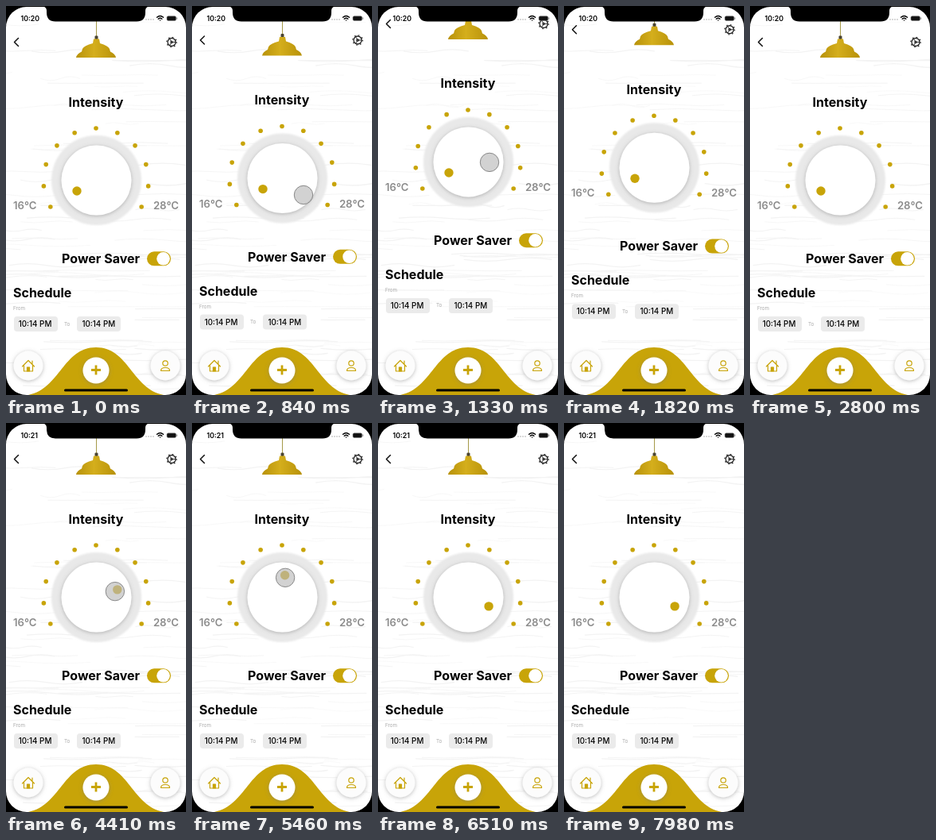
An HTML page that plays this animation: 226x490 px, repeating every 8 s.

```html
<!DOCTYPE html>
<html lang="en">
<head>
<meta charset="utf-8">
<style>
  html, body { margin: 0; width: 100%; height: 100%; overflow: hidden; background: #000; }
  svg { display: block; width: 100vw; height: 100vh; font-family: Inter, sans-serif; }
  .line { fill: none; stroke-linecap: round; stroke-linejoin: round; }
  .gold { fill: #c8a408; }
  .goldline { stroke: #c8a408; stroke-width: 1.2; }
  .title { font-size: 16px; font-weight: 750; }
  .temp { font-size: 13.2px; font-weight: 600; fill: #8c8c8c; }
  .small { font-size: 6.3px; fill: #aaa; }
  .time { font-size: 9.8px; font-weight: 500; text-anchor: middle; }
</style>
</head>
<body>
<svg viewBox="0 0 226 490">
  <defs>
    <clipPath id="screen"><rect y="1" width="226" height="489" rx="26"/></clipPath>
    <filter id="shadow" x="-40%" y="-40%" width="180%" height="180%">
      <feDropShadow dx="0" dy="1" stdDeviation="2.5" flood-color="#777" flood-opacity=".5"/>
    </filter>
    <filter id="soft" x="-20%" y="-20%" width="140%" height="140%"><feGaussianBlur stdDeviation=".8"/></filter>
    <linearGradient id="shade">
      <stop stop-color="#b8920a"/><stop offset=".45" stop-color="#d4ae1c"/><stop offset="1" stop-color="#b8920a"/>
    </linearGradient>
  </defs>

  <g clip-path="url(#screen)">
    <rect width="226" height="490" fill="#fff"/>
    <g id="wood" class="line" stroke="#f3f3f3"></g>

    <g id="page">
      <path d="M113.500 0V38" stroke="#a59a4a" stroke-width="1"/>
      <rect x="111.500" y="37.500" width="4" height="4.500" rx="1" fill="#4a4433"/>
      <path d="M110 41.500H117L118 47Q128 50 130 54L131 57.500Q137 60 138 65H88Q89 60 95 57.500L96 54Q98 50 109 47Z" fill="url(#shade)"/>
      <path class="line" d="M15.500 40.500L10.500 45.500L15.500 50.500" stroke="#111" stroke-width="1.500"/>
      <g class="line" stroke="#222">
        <circle cx="208" cy="45.500" r="5" stroke-width="1.300"/>
        <circle cx="208" cy="45.500" r="6.200" stroke-width="1.300" stroke-dasharray="1.500 3.370" stroke-linecap="butt"/>
        <path d="M208 45.500H213M208 45.500L205.500 41.200M208 45.500L205.500 49.800" stroke-width=".9"/>
        <circle cx="208" cy="45.500" r="1.400" stroke-width="1"/>
      </g>

      <text class="title" x="113" y="126.500" text-anchor="middle">Intensity</text>
      <g id="ticks" class="gold"></g>
      <circle cx="113.500" cy="219.500" r="56.500" fill="#e9e9e9" filter="url(#soft)"/>
      <circle cx="113.500" cy="219.500" r="44" fill="#fff" filter="url(#shadow)"/>
      <circle id="knob" class="gold" r="5.700"/>
      <text class="temp" x="9" y="256">16°C</text>
      <text class="temp" x="217" y="256" text-anchor="end">28°C</text>

      <text class="title" x="168" y="324" text-anchor="end">Power Saver</text>
      <rect class="gold" x="177" y="309.300" width="30" height="18" rx="9"/>
      <circle cx="197.500" cy="318.300" r="8.300" fill="#fff"/>

      <text class="title" x="9" y="367">Schedule</text>
      <text class="small" x="9" y="383">From</text>
      <rect x="10" y="391" width="55" height="19" rx="4" fill="#ebebeb"/>
      <rect x="89" y="391" width="55" height="19" rx="4" fill="#ebebeb"/>
      <text class="time" x="36.500" y="404">10:14 PM</text>
      <text class="time" x="116.300" y="404">10:14 PM</text>
      <text class="small" x="73" y="402.500">To</text>
    </g>

    <path class="gold" d="M28 490C68 482 72 430 113 430S158 482 198 490Z"/>
    <g fill="#fcfcfc" filter="url(#shadow)">
      <circle cx="28" cy="453" r="18.500"/><circle cx="200" cy="453" r="18.500"/>
      <circle cx="113" cy="459" r="16.500" fill="#fff"/>
    </g>
    <path d="M107 458.500H119M113 452.500V464.500" stroke="#c8a408" stroke-width="2.800"/>
    <g class="line goldline">
      <path d="M20.500 454L28 446.500L35.500 454M22.500 452.500V460H33.500V452.500M33 447V450.500"/>
      <path class="gold" d="M26.500 460V455H29.500V460Z"/>
      <circle cx="200" cy="450" r="3.200"/>
      <path d="M194.500 459.500Q194.500 455.500 200 455.500T205.500 459.500Z"/>
    </g>
    <rect x="73" y="482.500" width="80" height="3" rx="1.500"/>

    <text id="clock" x="18.500" y="19" font-size="8.8" font-weight="600"></text>
    <path d="M176 17H186" class="line" stroke="#999" stroke-width="1.400" stroke-dasharray="0 3"/>
    <path class="line" d="M189.500 14.300Q193.500 10.800 197.500 14.300M191.200 16.200Q193.500 14.200 195.800 16.200M193.500 18V18" stroke="#000" stroke-width="1.400"/>
    <rect x="202" y="12.800" width="11.500" height="5.600" rx="1.600" fill="#111" stroke="#777" stroke-width=".6"/>
    <path d="M214.700 14.500V16.700" stroke="#777" stroke-width=".9"/>
    <path d="M45 0Q51 1 51 6V8Q51 19.500 62 19.500H164Q175 19.500 175 8V6Q175 1 181 0Z"/>

    <circle id="touch" r="11.700" fill="#bbb" fill-opacity=".65" stroke="#888" stroke-width="1"/>
  </g>
</svg>
<script>
const LOOP = 8000;
const el = id => document.getElementById(id);
const place = (node, x, y) => node.setAttribute('transform', `translate(${x} ${y})`);
const polar = (cx, cy, r, deg) => {
  const a = deg * Math.PI / 180;
  return [cx + r * Math.cos(a), cy + r * Math.sin(a)];
};

let seed = 7;
const random = () => (seed = seed * 16807 % 2147483647) / 2147483647;

// Faint wood grain
let grain = '';
for (let i = 0; i < 85; i++) {
  const x = random() * 230 - 50, y = 20 + random() * 465;
  const length = 40 + random() * 120, bend = random() * 10 - 5;
  grain += `<path d="M${x} ${y}q${length / 4} ${bend} ${length / 2} 0t${length / 2} 0" stroke-width="${0.4 + random()}"/>`;
}
el('wood').innerHTML = grain;

el('ticks').innerHTML = Array.from({ length: 11 }, (_, i) => {
  const [x, y] = polar(113, 220, 66, 150 + 24 * i);
  return `<circle cx="${x}" cy="${y}" r="2.800"/>`;
}).join('');

// Eased value along [time, value] keys
function follow(keys, t) {
  const next = keys.findIndex(key => key[0] > t);
  if (next === 0) return keys[0][1];
  if (next < 0) return keys[keys.length - 1][1];
  const [t0, v0] = keys[next - 1], [t1, v1] = keys[next];
  const p = (t - t0) / (t1 - t0);
  return v0 + (v1 - v0) * p * p * (3 - 2 * p);
}

const scrollKeys = [[700, 0], [1400, -23.7], [1600, -23.7], [2170, 0]];
const dialKeys = [[3500, 151], [4640, 362], [5250, 266], [6400, 384]];

function draw(now) {
  const t = now % LOOP;
  const scroll = follow(scrollKeys, t);
  const angle = follow(dialKeys, t);
  const scrolling = t >= 700 && t < 1600;
  const turning = t >= 3500 && t < 6450;

  place(el('page'), 0, scroll);
  place(el('knob'), ...polar(113.5, 219.5, 28, angle));
  el('clock').textContent = t < 3010 ? '10:20' : '10:21';

  const touch = el('touch');
  touch.style.display = scrolling || turning ? '' : 'none';
  if (scrolling) place(touch, 140, 243 + 2 * scroll);
  else if (turning) place(touch, ...polar(113, 219.5, 25, angle + 3));

  requestAnimationFrame(draw);
}
requestAnimationFrame(draw);
</script>
</body>
</html>
```
